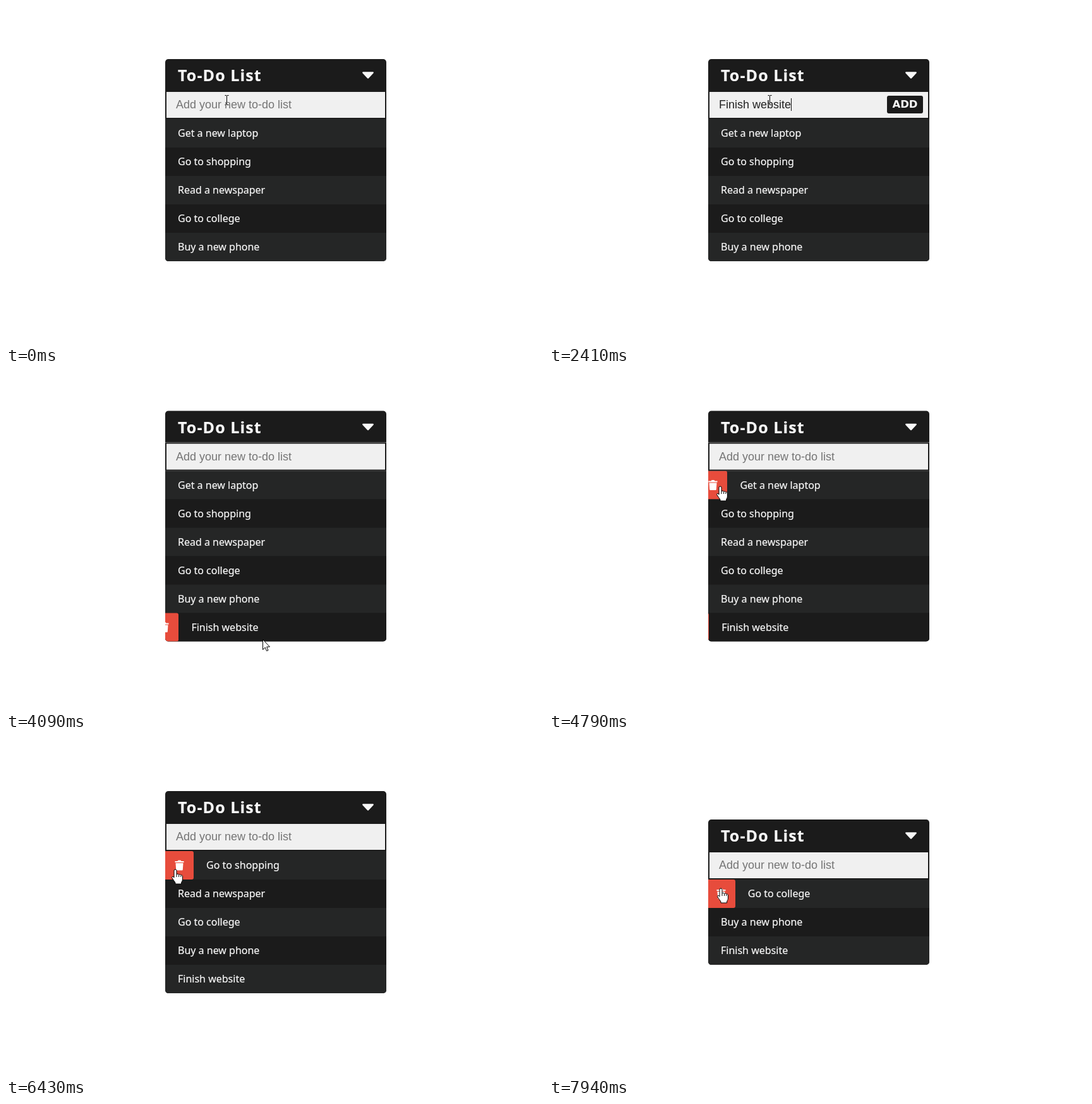
Write an HTML page that moves like this. It is 850 px wide and 535 px high and loops after 8 s.

```html
<!DOCTYPE html>
<html lang="en">
<head>
<meta charset="utf-8">
<title>To-Do List</title>
<style>
html, body { margin: 0; width: 100%; height: 100%; overflow: hidden; background: #fff; }
#card {
  position: absolute; left: 252px; top: 244px; width: 350px;
  transform: translateY(-50%); color: #f8f8f8;
  font: 16px "Noto Sans", "Open Sans", sans-serif;
}
header, .row { -webkit-text-stroke: .2px; }
header {
  height: 50px; padding-left: 20px; background: #1b1b1b; border-radius: 5px 5px 0 0;
  font-size: 25px; font-weight: 700; line-height: 50px; letter-spacing: 1.1px;
}
header svg { position: absolute; left: 311px; top: 19px; }
#field {
  position: relative; box-sizing: border-box; height: 45px; padding-left: 15px;
  border: 2px solid #1b1b1b; background: #f0f0f0; color: #222;
  font: 18px/41px "Liberation Sans", Arial, sans-serif; white-space: pre;
}
#field.empty { color: #757575; }
#caret { position: absolute; top: 10px; width: 1px; height: 20px; background: #111; }
#add {
  position: absolute; left: 281px; top: 6px; width: 57px; height: 28px;
  border-radius: 3px; background: #1b1b1b; color: #f8f8f8; text-align: center;
  font: 700 16.5px/28px "DejaVu Sans", sans-serif;
}
#list { position: relative; overflow: hidden; background: #1b1b1b; border-radius: 0 0 5px 5px; }
.row { position: relative; height: 45px; line-height: 45px; background: #252626; white-space: pre; }
.row.even { background: #1b1b1b; }
.row span { position: absolute; left: 20px; }
.bin {
  position: absolute; left: -45px; width: 45px; height: 45px;
  border-radius: 0 3px 3px 0; background: #e74c3c;
}
.bin svg { position: absolute; left: 15px; top: 14px; }
#ring {
  position: absolute; left: -12px; top: -12px; width: 24px; height: 24px;
  border-radius: 50%; background: rgba(255, 255, 0, .53);
}
.cursor { position: absolute; left: -20px; top: -20px; }
#beam { mix-blend-mode: difference; }
</style>
</head>
<body>
<div id="card">
  <header>To-Do List
    <svg width="20" height="14"><path d="M2.3 2.4H17.7L10 10.6Z" fill="#f8f8f8" stroke="#f8f8f8" stroke-width="2.4" stroke-linejoin="round"/></svg>
  </header>
  <div id="field"><span id="value"></span><i id="caret"></i><div id="add">ADD</div></div>
  <div id="list"></div>
</div>
<div id="ring"></div>
<svg id="beam" class="cursor" width="50" height="50">
  <path d="M17 12.5H19.5M20.5 12.5H23M17 27.5H19.5M20.5 27.5H23M20 13V27" stroke="#eee" fill="none"/>
</svg>
<svg id="hand" class="cursor" width="50" height="50">
  <path transform="translate(20 20)" fill="#fff" stroke="#000" stroke-linejoin="round"
    d="M-2 2a2 2 0 0 1 4 0V8c.5-1.3 3.4-1.1 3.6.6 .8-1 3-.7 3.2.8 .8-.8 2.6-.3 2.6 1.5V16c0 2-1.4 3.4-1.8 5V23H0V21c-1.3-2.4-3.7-4.8-5-7.2-1-1.9.6-3.2 2-2L-2 13Z"/>
  <path d="M22 28V32M25.6 29V32M28.8 30V32" stroke="#000"/>
</svg>
<svg id="arrow" class="cursor" width="50" height="50">
  <path transform="translate(20 20)" fill="#fff" stroke="#000" d="M.5.5V16.5L4.2 13 6.6 18.5 9 17.5 6.7 12H11.5Z"/>
</svg>
<script>
const LOOP = 8000, STEP = 5, SLIDE = 45, SLIDE_MS = 200, KEY_GAP = 80;
const LEFT = 252, WIDTH = 350, HEAD = 95, ROW = 45, MIDDLE = 244;
const $ = id => document.getElementById(id);
const clamp = (v, low, high) => Math.max(low, Math.min(high, v));
const ease = s => s * s * (3 - 2 * s);

const tasks = ["Get a new laptop", "Go to shopping", "Read a newspaper",
  "Go to college", "Buy a new phone", "Finish website"];
const addTime = 3540;
const deleteTimes = [5500, 6950, 7750];
const clicks = [addTime, ...deleteTimes];

// Bursts of typing: start time and the letters struck at an even pace
const bursts = { 130: "F", 270: "in", 600: "is", 810: "h ", 1490: "webs", 2210: "i", 2325: "te" };

// Eased pointer glides; bow bends the path downwards
const glides = [
  { start: 2940, end: 3469, x: 552, y: 157, bow: 40 },
  { start: 3690, end: 4300, x: 351, y: 434, bow: 85 },
  { start: 4300, end: 4440, x: 270, y: 400, bow: 18 },
  { start: 4583, end: 4676, x: 271, y: 181, bow: 0 },
  { start: 4790, end: 5300, x: 274, y: 178, bow: 0 },
  { start: 5720, end: 5980, x: 267, y: 200, bow: 0 },
  { start: 5980, end: 6860, x: 268, y: 215, bow: 0 },
  { start: 7160, end: 7700, x: 272, y: 238, bow: 0 }
];

function pointer(t) {
  let x = 349, y = 149;
  for (const g of glides) {
    const p = ease(clamp((t - g.start) / (g.end - g.start), 0, 1));
    x += (g.x - x) * p;
    y += (g.y - y) * p + g.bow * Math.sin(Math.PI * p);
  }
  return { x, y };
}

function typedText(t) {
  return Object.entries(bursts).map(([start, letters]) =>
    letters.slice(0, Math.max(0, Math.floor((t - start) / KEY_GAP) + 1))).join("");
}

const passed = (times, t) => times.filter(v => v <= t).length;

function layout(t) {
  const first = passed(deleteTimes, t), end = t < addTime ? 5 : 6;
  return { first, end, top: MIDDLE - (HEAD + ROW * (end - first)) / 2 };
}

const inside = x => x >= LEFT && x < LEFT + WIDTH;

function hoveredTask({ x, y }, { first, end, top }) {
  const i = first + Math.floor((y - top - HEAD) / ROW);
  return inside(x) && i >= first && i < end ? i : -1;
}

// Slide offset of every task at each step; a list change resets them
const slides = [];
let offsets = tasks.map(() => 0), lastClicks = 0;
for (let t = 0; t <= LOOP; t += STEP) {
  const count = passed(clicks, t), hit = hoveredTask(pointer(t), layout(t));
  const change = SLIDE * STEP / SLIDE_MS;
  offsets = offsets.map((v, i) =>
    count !== lastClicks ? 0 : clamp(v + (i === hit ? change : -change), 0, SLIDE));
  lastClicks = count;
  slides.push(offsets);
}

const trash = `<svg width="15" height="17" fill="#fff"><path d="M.5 2H4.5L5.5 .5H9.5L10.5 2H14.5V4H.5ZM1.5 5H13.5L12.8 15.5Q12.7 16.5 11.7 16.5H3.3Q2.3 16.5 2.2 15.5Z"/></svg>`;
const rows = tasks.map(text => {
  const row = document.createElement("div");
  row.innerHTML = `<div class="bin">${trash}</div><span>${text}</span>`;
  $("list").append(row);
  return row;
});

const show = (el, on) => { el.style.display = on ? "" : "none"; };
const move = (el, x, y) => { el.style.transform = `translate(${x}px,${y}px)`; };

function cursorKind(pos, box, hit, slide) {
  if (hit >= 0) return pos.x < LEFT + slide[hit] ? "hand" : "arrow";
  const dy = pos.y - box.top;
  if (!inside(pos.x) || dy < 50 || dy > HEAD) return "arrow";
  return box.end === 5 && pos.x > 535 ? "hand" : "beam";
}

function draw(t) {
  const box = layout(t), pos = pointer(t), slide = slides[Math.floor(t / STEP)];
  const pressed = clicks.some(c => t >= c - 65 && t < c + 175);

  const text = t < addTime ? typedText(t) : "";
  $("value").textContent = text || "Add your new to-do list";
  $("field").className = text ? "" : "empty";
  show($("add"), text);
  show($("caret"), text && !pressed);
  $("caret").style.left = 15 + $("value").offsetWidth + "px";

  rows.forEach((row, i) => {
    show(row, i >= box.first && i < box.end);
    row.className = (i - box.first) % 2 ? "row even" : "row";
    row.firstChild.style.left = slide[i] - SLIDE + "px";
    row.lastChild.style.left = 20 + slide[i] + "px";
  });

  const x = Math.round(pos.x), y = Math.round(pos.y);
  const kind = cursorKind(pos, box, hoveredTask(pos, box), slide);
  for (const id of ["beam", "hand", "arrow"]) {
    show($(id), id === kind);
    move($(id), kind === "beam" ? x + .5 : x, y);
  }
  show($("ring"), pressed);
  move($("ring"), x - 1, y);
}

const start = performance.now();
function tick() {
  draw((performance.now() - start) % LOOP);
  requestAnimationFrame(tick);
}
tick();
</script>
</body>
</html>
```
